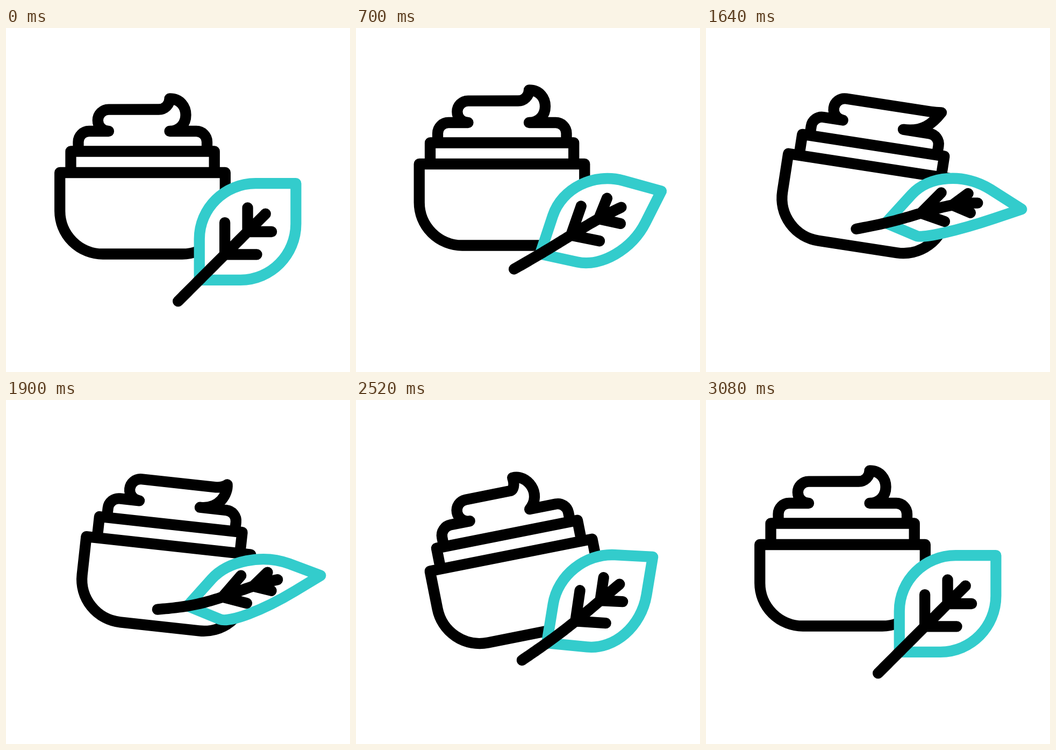
Recreate the animation shown at these times as an HTML page with a canvas. Size 640 px wide and 640 px high, loop 3.6 s.

```html
<!DOCTYPE html>
<html lang="en">
<head>
<meta charset="utf-8">
<title>Cream jar and leaf</title>
<style>
  html, body { margin: 0; width: 100%; height: 100%; overflow: hidden; background: #fff; }
  canvas { display: block; width: 640px; height: 640px; }
</style>
</head>
<body>
<canvas id="stage"></canvas>
<script>
const LOOP = 3600, STEP = 20;
const INK = '#000', TEAL = '#33cccc', LINE = 20.3;
const { PI, sin, cos, abs } = Math;

const canvas = document.getElementById('stage');
const ctx = canvas.getContext('2d');
const dpr = window.devicePixelRatio || 1;
canvas.width = canvas.height = 640 * dpr;

// time, shift x, shift y, lean of the cream tip (-1 left, 1 right)
const JAR = [
  [220, 0, 0, 0],
  [700, 17.5, -16, 0],
  [1200, 39, -23, -1],
  [1640, 51.2, -11.8, 1],
  [2180, 42.5, 16, 0.05],
  [2520, 34.5, 19.5, -1],
  [3080, 0, 0, 0]
];

// time, tilt in degrees
const TILT = [[220, 0], [700, 0], [1240, -10], [1730, 10.6], [2350, -13], [3080, 0]];

// time, angle in degrees, height of the middle, bow, squash
const LEAF = [
  [220, -45, 398.8, 0, 0],
  [700, -27.9, 376, -8, 0.1],
  [1200, -5.5, 348, -14, 0.2],
  [1640, -6.8, 355.5, -20, 0.28],
  [1840, -9, 356.5, -8, 0.29],
  [2180, -27.7, 368.5, 22, 0.28],
  [2520, -38.3, 388, 4, 0.06],
  [3080, -45, 398.8, 0, 0]
];

// Cream curl: bar end x, corner x, tip, two handles of the curl.
const CURL = {
  rest: [284, 304.5, 304.5, 131.5, 344.5, 131.5, 344.5, 192],
  left: [275, 288, 284.6, 128.4, 312, 126, 334, 168],
  right: [350, 360, 370, 150, 357, 173, 341, 191.5]
};

const mixRow = (a, b, k) => a.map((v, i) => v + (b[i] - v) * k);

// Smooth path through key rows; flat at turning points and at both ends.
function sample(keys, t) {
  const last = keys.length - 1;
  if (t <= keys[0][0]) return keys[0].slice(1);
  if (t >= keys[last][0]) return keys[last].slice(1);
  const k = keys.findIndex(row => row[0] > t) - 1;
  const span = keys[k + 1][0] - keys[k][0];
  const p = (t - keys[k][0]) / span, p2 = p * p, p3 = p2 * p;
  const slope = (i, n) => {
    if (i === 0 || i === last) return 0;
    const before = keys[i][n] - keys[i - 1][n];
    const after = keys[i + 1][n] - keys[i][n];
    return before * after <= 0 ? 0 : (before + after) / (keys[i + 1][0] - keys[i - 1][0]);
  };
  return keys[k].map((v, n) =>
    v * (2 * p3 - 3 * p2 + 1) + keys[k + 1][n] * (3 * p2 - 2 * p3) +
    span * (slope(k, n) * (p3 - 2 * p2 + p) + slope(k + 1, n) * (p3 - p2))).slice(1);
}

// Crossing of the lines a-b and c-d.
function cross(a, b, c, d) {
  const ux = b[0] - a[0], uy = b[1] - a[1];
  const vx = d[0] - c[0], vy = d[1] - c[1];
  const k = ((c[0] - a[0]) * vy - (c[1] - a[1]) * vx) / (ux * vy - uy * vx);
  return [a[0] + ux * k, a[1] + uy * k];
}

// Rounded corner from p to q around corner c.
function bend(p, c, q) {
  ctx.bezierCurveTo(...mixRow(p, c, 0.5523), ...mixRow(q, c, 0.5523), ...q);
}

function drawJar(t) {
  const [dx, dy, lean] = sample(JAR, t);
  const [tilt] = sample(TILT, t);
  const [endX, cornerX, tx, ty, ...handles] =
    mixRow(CURL.rest, lean < 0 ? CURL.left : CURL.right, abs(lean));

  ctx.save();
  ctx.translate(254 + dx, 269 + dy);
  ctx.rotate(tilt * PI / 180);
  ctx.translate(-254, -269);
  ctx.beginPath();

  // bowl
  ctx.moveTo(100.2, 269);
  ctx.lineTo(407.8, 269);
  ctx.arcTo(407.8, 420.5, 327, 420.5, 80);
  ctx.arcTo(100.2, 420.5, 100.2, 340, 80);
  ctx.closePath();

  // neck
  ctx.moveTo(120.5, 265);
  ctx.lineTo(120.5, 229.5);
  ctx.lineTo(387.7, 229.5);
  ctx.lineTo(387.7, 265);

  // lower cream, left
  ctx.moveTo(134.5, 222);
  ctx.arcTo(134.5, 192, 154.5, 192, 20);
  ctx.lineTo(191, 192);

  // upper cream with its curl
  ctx.arc(191, 171.8, 20.2, PI / 2, PI * 1.5);
  ctx.lineTo(endX, 151.5);
  bend([endX, 151.5], [cornerX, 151.5], [tx, ty]);
  ctx.bezierCurveTo(...handles, 304.5, 192);

  // lower cream, right
  ctx.lineTo(354, 192);
  ctx.arcTo(374, 192, 374, 212, 20);
  ctx.lineTo(374, 222);

  ctx.strokeStyle = INK;
  ctx.stroke();
  ctx.restore();
}

// Leaf space: u runs along the stem, v across it. The leaf is squashed more
// towards its tip and bowed along the line from stem foot to tip.
const FOOT = -183, TIP = 127, MIDDLE = (FOOT + TIP) / 2;

function leafMap(t) {
  const [angle, midY, bow, squash] = sample(LEAF, t);
  const c = cos(angle * PI / 180), s = sin(angle * PI / 180);
  return (u, v) => {
    const along = PI * (u - FOOT) / (TIP - FOOT);
    const x = u - MIDDLE;
    const y = v * (1 - squash * (1.37 + 0.005 * u)) +
      bow * sin(along) + 24 * squash * sin(2 * along);
    return [429.75 + 13 * squash + x * c - y * s, midY + x * s + y * c];
  };
}

function drawLeaf(at) {
  const base = at(-TIP, 0), tip = at(TIP, 0);
  const left = at(-73, -54), top = at(74, -53);
  const right = at(74, 53), low = at(-73, 54);
  ctx.beginPath();
  ctx.moveTo(...base);
  ctx.lineTo(...left);
  bend(left, cross(base, left, tip, top), top);
  ctx.lineTo(...tip);
  ctx.lineTo(...right);
  bend(right, cross(tip, right, base, low), low);
  ctx.closePath();
  ctx.fillStyle = '#fff';
  ctx.fill();
  ctx.strokeStyle = TEAL;
  ctx.stroke();
}

function drawVeins(at) {
  ctx.beginPath();
  for (let u = FOOT; u <= 47; u += 5) ctx.lineTo(...at(u, 0));
  for (const [fork, size] of [[-60, 42], [0, 31.5]]) {
    ctx.moveTo(...at(fork + size, -size));
    ctx.lineTo(...at(fork, 0));
    ctx.lineTo(...at(fork + size, size));
  }
  ctx.strokeStyle = INK;
  ctx.stroke();
}

function draw(t) {
  ctx.setTransform(dpr, 0, 0, dpr, 0, 0);
  ctx.fillStyle = '#fff';
  ctx.fillRect(0, 0, 640, 640);
  ctx.lineWidth = LINE;
  ctx.lineCap = ctx.lineJoin = 'round';
  drawJar(t);
  const at = leafMap(t);
  drawLeaf(at);
  drawVeins(at);
}

const start = performance.now();
function tick() {
  const t = (performance.now() - start) % LOOP;
  draw(Math.floor(t / STEP) * STEP);
  requestAnimationFrame(tick);
}
tick();
</script>
</body>
</html>
```
